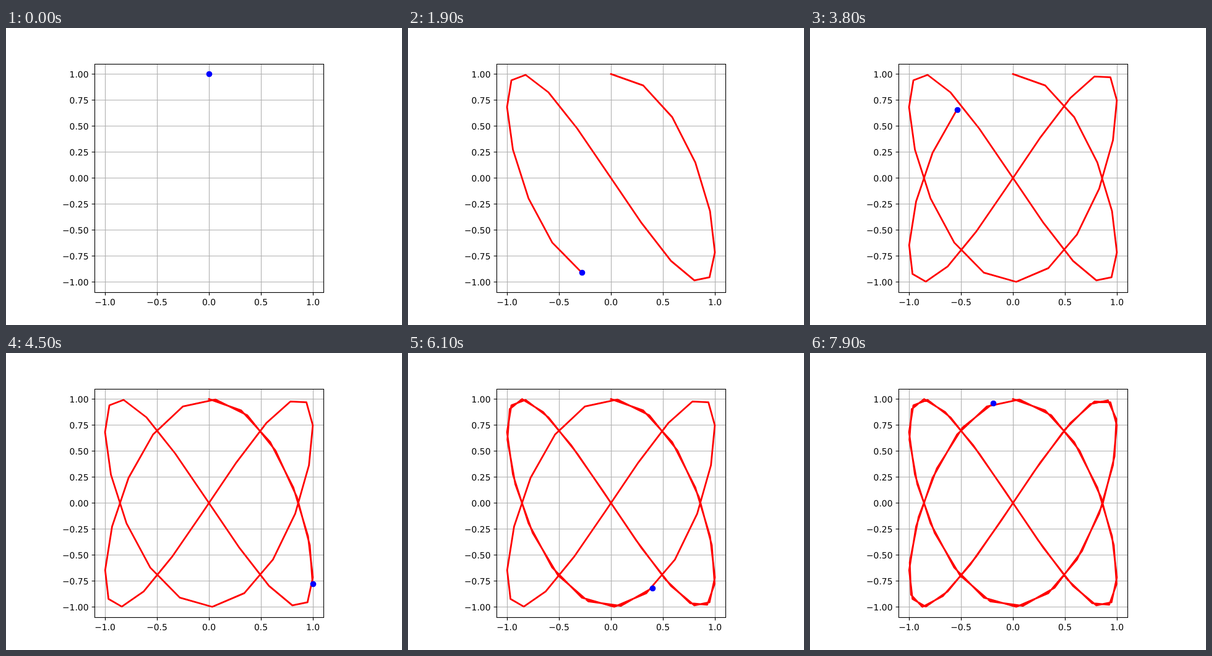
Write an HTML page that moves like this. It is 640 px wide and 480 px high and loops after 8 s.

```html
<!DOCTYPE html>
<html lang="en">
<head>
<meta charset="utf-8">
<title>Lissajous curve</title>
<style>
  html, body { margin: 0; width: 100%; height: 100%; overflow: hidden; background: #fff; }
  svg { display: block; width: 640px; height: 480px; }
  text { font: 13.889px "DejaVu Sans", sans-serif; text-rendering: geometricPrecision; }
</style>
</head>
<body>
<svg viewBox="0 0 640 480">
  <rect width="640" height="480" fill="#fff"/>
  <path id="grid" stroke="#b0b0b0" stroke-width="1.11"/>
  <path id="ticks" stroke="#000" stroke-width="1.11"/>
  <g id="labels"></g>
  <polyline id="trail" fill="none" stroke="#f00" stroke-width="2.778"
    stroke-linecap="square" stroke-linejoin="round"/>
  <circle id="dot" r="4.86" fill="#00f"/>
  <rect x="143.5" y="58.5" width="370" height="369" fill="none" stroke="#000" stroke-width="1.11"/>
</svg>
<script>
const LOOP = 8000, FRAME = 100;
const STEP = 10 * Math.PI / 199;
const el = id => document.getElementById(id);
const px = x => 328 + 168 * x;
const py = y => 242.4 - 168 * y;
const snap = v => Math.round(v) + 0.5;

function addLabel(x, y, anchor, value, digits) {
  const label = document.createElementNS("http://www.w3.org/2000/svg", "text");
  label.setAttribute("x", x);
  label.setAttribute("y", y);
  label.setAttribute("text-anchor", anchor);
  label.textContent = value.toFixed(digits).replace("-", "\u2212");
  el("labels").append(label);
}

function drawAxes() {
  let grid = "", ticks = "";
  for (let i = -2; i <= 2; i++) {
    const x = snap(px(i / 2));
    grid += `M${x} 58V427`;
    ticks += `M${x} 427.5v4.86`;
    addLabel(px(i / 2), 448, "middle", i / 2, 1);
  }
  for (let i = -4; i <= 4; i++) {
    const y = snap(py(i / 4));
    grid += `M143 ${y}H513`;
    ticks += `M143.5 ${y}h-4.86`;
    addLabel(133.5, y + 5.5, "end", i / 4, 2);
  }
  el("grid").setAttribute("d", grid);
  el("ticks").setAttribute("d", ticks);
}

const pointAt = i => [px(Math.sin(2 * STEP * i)), py(Math.cos(3 * STEP * i))];

let shown = -1;
function render(time) {
  const index = Math.floor((time % LOOP) / FRAME);
  if (index !== shown) {
    shown = index;
    const points = Array.from({ length: index + 1 }, (_, i) => pointAt(i));
    const [x, y] = points[index];
    el("trail").setAttribute("points", index ? points.join(" ") : "");
    el("dot").setAttribute("cx", snap(x));
    el("dot").setAttribute("cy", snap(y));
  }
  requestAnimationFrame(render);
}

drawAxes();
render(0);
</script>
</body>
</html>
```
